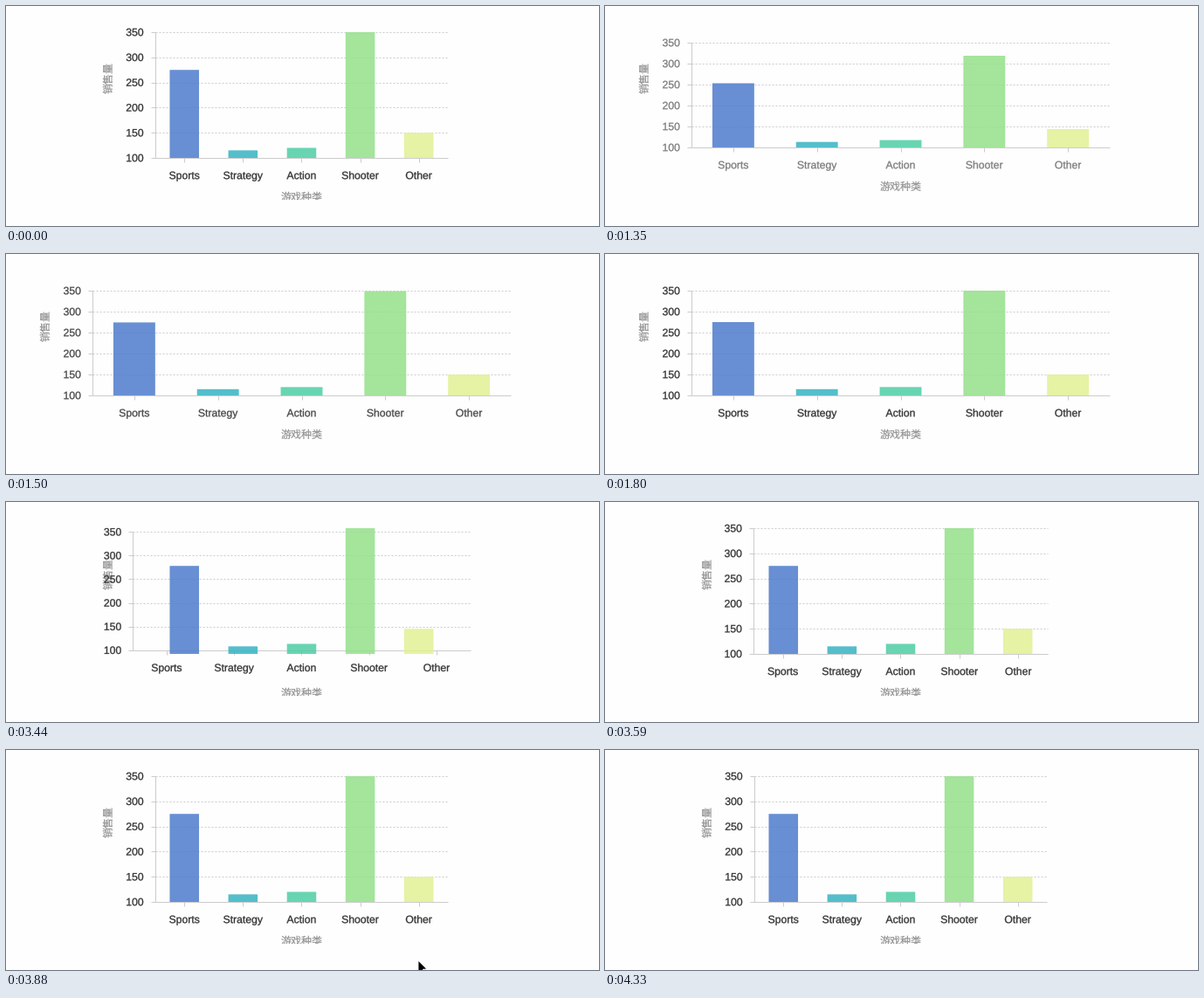
Recreate the animation shown at these times as a matplotlib script. Size 679 by 252 pixels, loop 5.25 s.

```python
import numpy as np
import matplotlib.pyplot as plt
from matplotlib.animation import FuncAnimation
from matplotlib.patches import Polygon, Rectangle
from matplotlib.patheffects import Stroke

W, H, DPI = 679, 252, 64
PX = 72 / DPI
STEP, LOOP = 30, 5250
CHANGES = [0, 1350, 1500, 1650, 1800, 3300, 3440, 3590, 3740,
           3880, 4030, 4180, 4330]

NAMES = ["Sports", "Strategy", "Action", "Shooter", "Other"]
VALUES = np.array([275, 115, 120, 350, 150])
COLORS = ["#4E7CCC", "#36B3C3", "#4ECDA5", "#94E08A", "#E2F194"]
TICKS = range(100, 351, 50)
INK, GRAY, BACK = "#333333", "#999999", "#fefefe"
LINE = "#cccccc"

# plot area: left, right, top, bottom
WIDE = np.array([99, 578, 42, 162])
NARROW = np.array([170.7, 506.2, 30, 174])
POINTER = {3880: (472, 241), 4030: (574, 227), 4180: (588, 245)}
ARROW = np.array([(0, 0), (0, 14), (3.2, 11), (5.3, 16), (7.5, 15),
                  (5.4, 10.2), (10, 10)])

plt.rcParams["text.hinting"] = "none"
fig = plt.figure(figsize=(W / DPI, H / DPI), dpi=DPI, facecolor=BACK)
ax = fig.add_axes([0, 0, 1, 1])
ax.set_xlim(0, W)
ax.set_ylim(H, 0)
ax.axis("off")


def line(**kw):
    return ax.plot([], [], color=LINE, lw=PX, zorder=1,
                   solid_capstyle="butt", dash_capstyle="butt", **kw)[0]


def label(s, ha="center"):
    # a hairline outline gives the text its slightly heavier weight
    return ax.text(0, 0, s, color=INK, family="Liberation Sans",
                   fontsize=12.2 * PX, ha=ha, va="baseline", zorder=4,
                   path_effects=[Stroke(linewidth=0.3 * PX)])


def title(s, **kw):
    return ax.text(0, 0, s, color=GRAY, family="Noto Sans CJK JP",
                   fontsize=12 * PX, ha="center", va="baseline", zorder=3,
                   **kw)


grid = [line(ls=(0, (2, 2))) for _ in TICKS]
y_ticks = [line() for _ in TICKS]
x_ticks = [line() for _ in NAMES]
y_axis, x_axis = line(), line()
y_labels = [label(str(v), ha="right") for v in TICKS]
x_labels = [label(s) for s in NAMES]
x_title = title("游戏种类")
y_title = title("销售量", rotation=90, rotation_mode="anchor")
bars = [ax.add_patch(Rectangle((0, 0), 1, 1, fc=c, lw=0, alpha=0.85,
                               zorder=2, snap=False)) for c in COLORS]
# hides whatever falls below the narrow chart's canvas
ax.add_patch(Rectangle((0, 222), W, H - 222, fc=BACK, lw=0, zorder=10))
pointer = ax.add_patch(Polygon(ARROW, fc="black", ec="white", lw=0.8 * PX,
                               zorder=11))


def centers(area):
    left, right = area[:2]
    return left + (right - left) * (np.arange(5) + 0.5) / 5


def height_at(area, value):
    top, bottom = area[2:]
    return bottom - (bottom - top) * (value - 100) / 250


def place_axes(area, alpha):
    left, right, top, bottom = area
    for v, g, tick, lab in zip(TICKS, grid, y_ticks, y_labels):
        y = height_at(area, v)
        g.set_data([left, right], [y, y])
        tick.set_data([left - 5, left], [y, y])
        lab.set_position((left - 13, y + 4.2))
        lab.set_alpha(alpha)
    for x, tick, lab in zip(centers(area), x_ticks, x_labels):
        tick.set_data([x, x], [bottom, bottom + 5])
        lab.set_position((x, bottom + 24.2))
        lab.set_alpha(alpha)
    y_axis.set_data([left, left], [top, bottom])
    x_axis.set_data([left, right], [bottom, bottom])


def place_bars(area, grow):
    width = (area[1] - area[0]) / 10
    bottom = area[3]
    for x, v, bar in zip(centers(area), VALUES, bars):
        tall = (bottom - height_at(area, v)) * grow
        bar.set_bounds(x - width / 2, bottom - tall, width, tall)


def draw(i):
    end = i * STEP + STEP - 1
    now = max(t for t in CHANGES if t <= end)
    wide = 1350 <= now < 3300
    area = WIDE if wide else NARROW

    # bars rise with a cubic ease-out while the labels fade in
    t = min(1, (now - 1125) / 450) if wide else 1
    place_bars(area, 1 - (1 - t) ** 3)

    # the axes glide from wide to narrow after the bars have jumped
    if now >= 3300:
        p = np.interp(now, [3300, 3440, 3590, 3740], [0.015, 0.646, 0.99, 1])
        place_axes(WIDE + (NARROW - WIDE) * p, 1)
    else:
        place_axes(area, t ** 0.8)

    x_title.set_position((338.5, area[3] + 49))
    y_title.set_position((49.6 if wide else 121.6, 82.5))

    pointer.set_visible(now in POINTER)
    if now in POINTER:
        pointer.set_xy(ARROW + POINTER[now])
    return []


anim = FuncAnimation(fig, draw, frames=LOOP // STEP, interval=STEP,
                     init_func=lambda: draw(0), repeat=True, repeat_delay=0)
plt.show()
```
